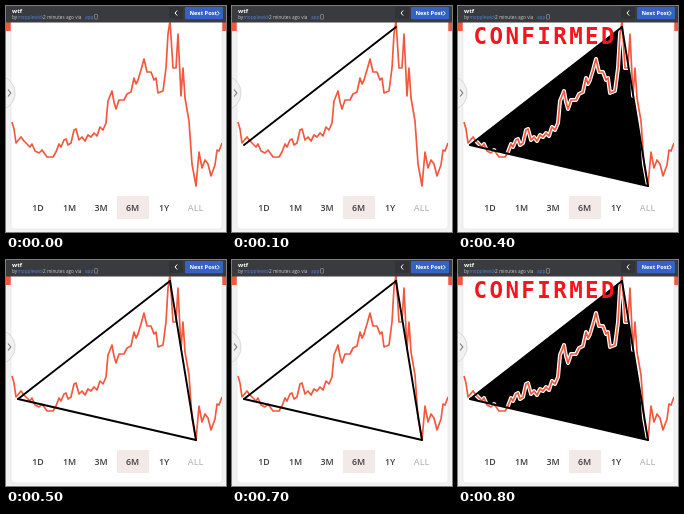
These frames come from a looping animation (220x226 px, 1 s). An HTML page:

```html
<!DOCTYPE html>
<html lang="en">
<head>
<meta charset="utf-8">
<title>Confirmed</title>
<style>
  html, body { margin: 0; width: 100%; height: 100%; overflow: hidden; background: #f1f1f2; }
  svg { display: block; width: 220px; height: 226px; }
  text { font-family: "Open Sans", sans-serif; }
  .range text { font-size: 8.8px; font-weight: 600; fill: #3c3c40; text-anchor: middle; }
  .meta { font-size: 4.7px; fill: #c9cacc; }
  .link { fill: #4f83d8; }
  .price { fill: none; stroke: #f2583e; stroke-width: 1.7; stroke-linejoin: round; }
  .halo { fill: none; stroke: #fff; stroke-width: 4; stroke-linejoin: round; }
  .edge { stroke: #000; stroke-width: 1.9; stroke-linecap: round; }
  .stamp { font: bold 22.5px "DejaVu Sans Mono", monospace; fill: #f5151c; letter-spacing: 2.4px; }
  .anim { opacity: 0; }
</style>
</head>
<body>
<svg viewBox="0 0 220 226">
  <defs>
    <path id="price"/>
    <clipPath id="inside"><path d="M12 139L164 21L190 180Z"/></clipPath>
    <clipPath id="card"><rect x="5" y="16" width="211" height="207" rx="3"/></clipPath>
  </defs>

  <rect width="220" height="226" fill="#f1f1f2"/>
  <rect y="15" width="220" height="10" fill="#f2583e"/>
  <rect x="5" y="12" width="211" height="211" rx="3" fill="#fff" stroke="#e2e2e4" stroke-width=".6"/>
  <use href="#price" class="price" clip-path="url(#card)"/>

  <g class="range">
    <rect x="111" y="190" width="32" height="23" fill="#f3e9e7"/>
    <text x="32" y="205">1D</text>
    <text x="63.5" y="205">1M</text>
    <text x="95" y="205">3M</text>
    <text x="126.5" y="205">6M</text>
    <text x="158" y="205">1Y</text>
    <text x="189.5" y="205" style="fill:#bcbcbf">ALL</text>
  </g>

  <circle cx="-8" cy="87" r="17" fill="#f1f1f2" stroke="#cfcfd2" stroke-width=".8"/>
  <path d="M2 83.5L4.8 87L2 90.5" fill="none" stroke="#77777c" stroke-width="1.1"/>

  <rect width="220" height="16.5" fill="#3a3b3f"/>
  <text x="6" y="6.6" font-size="6" font-weight="700" fill="#fff">wtf</text>
  <text x="6" y="12.8" class="meta">by</text>
  <text x="11.5" y="12.8" class="meta link">mopplewick</text>
  <text x="37" y="12.8" class="meta" fill="#ddd">2 minutes ago via</text>
  <text x="79" y="12.8" class="meta link" font-size="4">app</text>
  <rect x="88.5" y="8.5" width="3" height="4.7" rx=".6" fill="none" stroke="#a5a6aa" stroke-width=".6"/>
  <rect x="163" y="1" width="14" height="12" rx="1" fill="#323337"/>
  <path d="M171.2 4.5L169 7L171.2 9.5" fill="none" stroke="#fff" stroke-width="1"/>
  <rect x="179" y="1" width="38" height="12.3" rx="1" fill="#3463c8"/>
  <text x="183.5" y="9.3" font-size="5.7" font-weight="700" fill="#fff">Next Post</text>
  <path d="M211.3 5L213.2 7.2L211.3 9.4" fill="none" stroke="#fff" stroke-width=".9"/>

  <g class="anim" data-on="4 6 8 9">
    <path d="M12 139L164 21L190 180Z"/>
    <g clip-path="url(#inside)">
      <use href="#price" class="halo"/>
      <use href="#price" class="price"/>
    </g>
  </g>
  <path class="edge anim" d="M12 139L164 21" data-on="1 2 3 4 5 6 7 8 9"/>
  <path class="edge anim" d="M164 21L190 180" data-on="2 3 4 5 6 7 8 9"/>
  <path class="edge anim" d="M190 180L12 139" data-on="3 4 5 6 7 8 9"/>
  <text class="stamp anim" x="15.5" y="38.3" data-on="4 6 8 9">CONFIRMED</text>
</svg>
<script>
  const LOOP = 1000, SLOTS = 10;

  const points = `6,116 8,123 10,137 15,131 18,135 21,138 24,141 26,138 29,145 33,147
    36,144 41,151 47,151 50,146 53,138 55,141 58,134 60,133 62,139 65,137 68,124 70,123
    73,134 76,131 79,135 82,129 85,131 88,127 91,130 94,121 97,124 100,117 102,95 106,85
    108,96 110,103 113,94 118,94 121,88 125,86 128,72 130,78 132,74 135,64 138,53 141,66
    145,66 148,74 150,72 152,87 157,85 160,62 162,28 164,15 167,62 170,62 172,28
    175,90 177,62 179,92 183,115 186,158 190,180 193,146 196,162 199,154 202,158
    205,170 209,159 211,144 213,145 216,137`;
  document.getElementById("price").setAttribute("d", "M" + points.trim().split(/\s+/).join("L"));

  const start = document.timeline.currentTime ?? 0;
  for (const el of document.querySelectorAll(".anim")) {
    const on = new Set(el.dataset.on.split(" ").map(Number));
    const steps = Array.from({ length: SLOTS + 1 }, (_, i) => ({
      opacity: on.has(Math.min(i, SLOTS - 1)) ? 1 : 0,
      offset: i / SLOTS,
      easing: "step-end"
    }));
    el.animate(steps, { duration: LOOP, iterations: Infinity }).startTime = start;
  }
</script>
</body>
</html>
```
